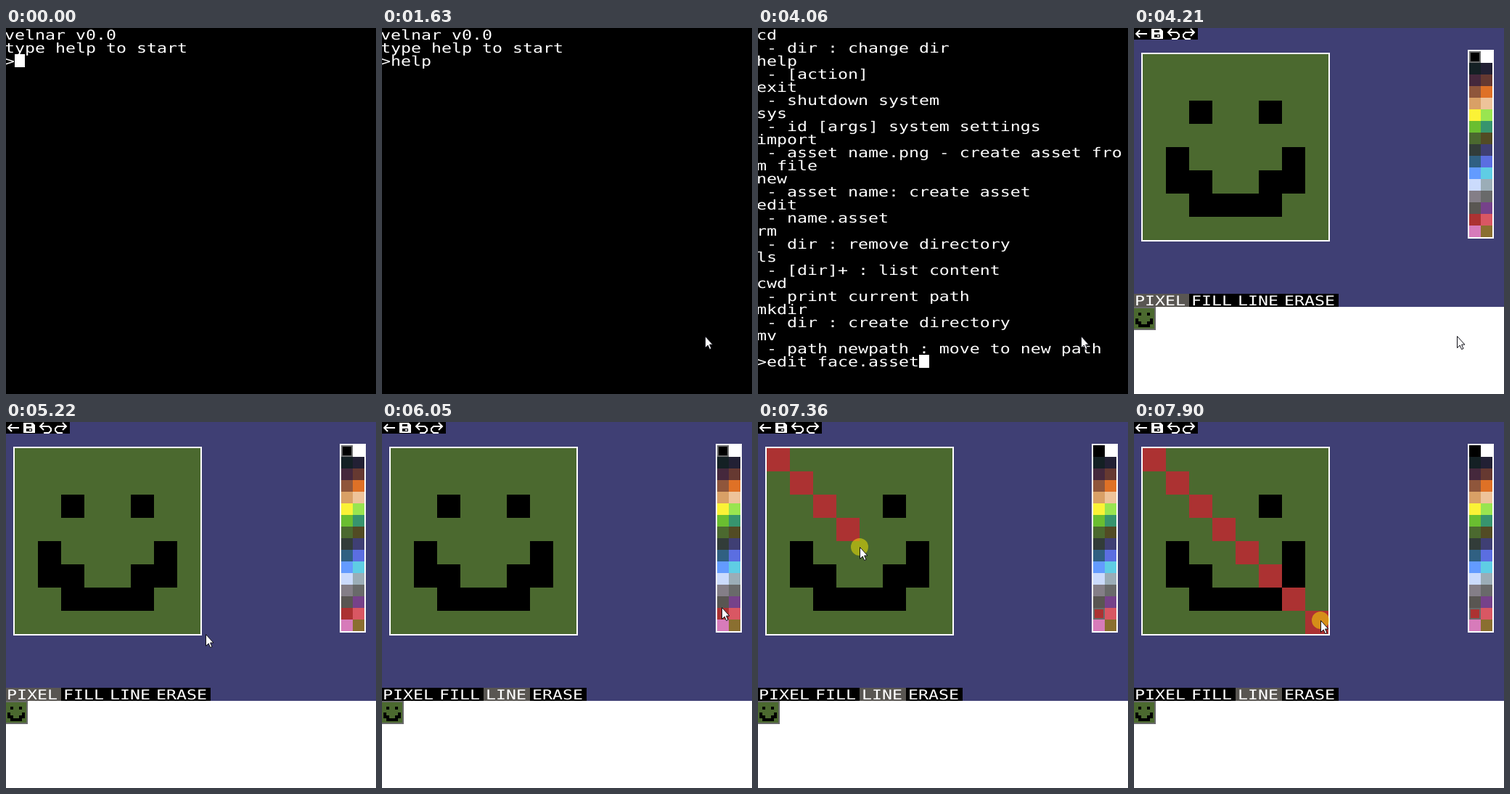
These frames come from a looping animation (510 by 504 pixels, 8 s). An HTML page:

```html
<!DOCTYPE html>
<html lang="en">
<head>
<meta charset="utf-8">
<title>Pixel console</title>
<style>
  html, body { margin: 0; width: 100%; height: 100%; overflow: hidden; background: #000; }
  svg { display: block; width: 510px; height: 504px; }
  text {
    font: 18.6px "DejaVu Sans Mono", "Liberation Mono", monospace;
    text-rendering: geometricPrecision;
    white-space: pre;
    fill: #fff;
  }
</style>
</head>
<body>
<svg id="stage" viewBox="0 0 510 504">
  <rect width="510" height="504"/>
  <g id="console"></g>
  <g id="editor"></g>
  <circle id="press" r="12" fill="#ffee00" opacity=".49"/>
  <path id="pointer" d="M.5 .5V16.5L4.2 13L6.6 18.5L9 17.5L6.6 12H11Z" fill="#fff" stroke="#101018"/>
</svg>
<script>
const LOOP = 8000, EDITOR_AT = 4210, MOVE_AT = 4760, STEP = 76.6;
const $ = id => document.getElementById(id);
const show = (el, on) => el.setAttribute('visibility', on ? 'inherit' : 'hidden');

function add(parent, tag, attrs, content = '') {
  const el = document.createElementNS('http://www.w3.org/2000/svg', tag);
  for (const key in attrs) el.setAttribute(key, attrs[key]);
  el.textContent = content;
  return parent.appendChild(el);
}
const rect = (parent, x, y, width, height, fill) =>
  add(parent, 'rect', { x, y, width, height, fill, 'shape-rendering': 'crispEdges' });
// The console face is a wide one: 14px per character.
const label = (parent, x, baseline, content) =>
  add(parent, 'text', { transform: `translate(${x - 2} ${baseline}) scale(1.25 1)` }, content);

// Console
const INTRO = ['velnar v0.0', 'type help to start'];
const HELP = `cd
 - dir : change dir
help
 - [action]
exit
 - shutdown system
sys
 - id [args] system settings
import
 - asset name.png - create asset fro
m file
new
 - asset name: create asset
edit
 - name.asset
rm
 - dir : remove directory
ls
 - [dir]+ : list content
cwd
 - print current path
mkdir
 - dir : create directory
mv
 - path newpath : move to new path`.split('\n');
const TYPED = [
  [0, ''], [1310, 'h'], [1480, 'he'], [1555, 'hel'], [1630, 'help'],
  [1800, ''], [2650, 'e'], [2820, 'ed'], [3050, 'edit'],
  [3510, 'edit '], [3660, 'edit face.asset']
];
const BLINKS = [200, 550, 930, 1240, 1600, 1950, 2330, 2650, 3050, 3350, 3740, 4060];

const consoleLayer = $('console');
const rows = Array.from({ length: 26 }, (_, i) => label(consoleLayer, 0, 18 * i + 16));
const caret = rect(consoleLayer, 0, 0, 14, 18, '#fff');

function drawConsole(t) {
  const typed = TYPED.filter(([at]) => at <= t).pop()[1];
  const history = t < 1800 ? INTRO : HELP;
  const lines = [...history, '>' + typed];
  rows.forEach((row, i) => {
    const line = lines[i] || '';
    if (row.textContent !== line) row.textContent = line;
  });
  caret.setAttribute('x', 12 + 14 * typed.length);
  caret.setAttribute('y', 18 * history.length);
  show(caret, BLINKS.filter(at => at <= t).length % 2 === 0);
}

// Editor
const GREEN = '#4b692f', RED = '#ac3232', GREY = '#595652';
const PALETTE = ('000000 ffffff 142024 222034 45283c 663931 8f563b df7126 ' +
  'd9a066 eec39a fbf236 99e550 6abe30 37946e 4b692f 524b24 ' +
  '323c39 3f3f74 306082 5b6ee1 639bff 5fcde4 cbdbfc 9badb7 ' +
  '847e87 696a6a 595652 76428a ac3232 d95763 d77bba 8a6f30').split(' ');

const editor = $('editor');
rect(editor, 0, 0, 510, 384, '#3f3f74');
rect(editor, 0, 384, 510, 120, '#fff');

function drawFace(x, y, cell) {
  const block = (col, row, w, h) =>
    rect(editor, x + col * cell, y + row * cell, w * cell, h * cell, '#000');
  rect(editor, x, y, 8 * cell, 8 * cell, GREEN);
  block(2, 2, 1, 1);
  block(5, 2, 1, 1);
  block(1, 4, 1, 2);
  block(6, 4, 1, 2);
  block(2, 5, 1, 1);
  block(5, 5, 1, 1);
  block(2, 6, 4, 1);
}
rect(editor, 10, 34, 260, 260, '#fff');
drawFace(12, 36, 32);
drawFace(-2, 384, 4);
add(editor, 'rect', { x: -1, y: 385, width: 30, height: 30, fill: 'none', stroke: '#696a6a', 'stroke-width': 2 });
const diagonal = Array.from({ length: 8 }, (_, i) => rect(editor, 12 + 32 * i, 36 + 32 * i, 32, 32, RED));

rect(editor, 460, 30, 36, 260, '#fff');
PALETTE.forEach((color, i) =>
  rect(editor, 462 + 16 * (i % 2), 32 + 16 * (i >> 1), 16, 16, '#' + color));
const swatch = add(editor, 'rect', { x: 463, width: 14, height: 14, fill: 'none', stroke: '#696a6a', 'stroke-width': 2 });

rect(editor, 0, 0, 88, 16, '#000');
const icon = (d, fill = 'none') =>
  add(editor, 'path', { d, fill, stroke: fill === 'none' ? '#fff' : 'none', 'stroke-width': 2, 'fill-rule': 'evenodd' });
icon('M3 8H18M8 3L3 8L8 13');
icon('M24 1H37L40 4V15H24ZM28 3V6H35V3ZM28 9V13H36V9ZM32 10H35V12H32Z', '#fff');
icon('M52 1L47 6L52 11M47 6H59L62 9V12L59 15H52');
icon('M78 1L83 6L78 11M83 6H71L68 9V12L71 15H78');

let left = -2;
const tools = ['PIXEL', 'FILL', 'LINE', 'ERASE'].map(name => {
  const width = 14 * name.length + 8;
  const back = rect(editor, left, 366, width, 18, '#000');
  label(editor, left + 5, 382, name);
  left += width;
  return back;
});

// Pointer: time, x, y
const PATH = [
  [70, 444, 408], [380, 456, 432], [549, 456, 432], [550, 445, 424],
  [4690, 445, 424], [4990, 375, 217], [5300, 240, 318], [5526, 152, 375],
  [5680, 152, 375], [5830, 375, 340], [5985, 484, 268], [6062, 468, 255],
  [6139, 470, 266], [6370, 470, 266], [6680, 420, 245], [7134, 30, 47],
  [7211, 30, 47], [7288, 112, 136], [7364, 140, 172], [7901, 257, 273]
];

function pointerAt(t) {
  const i = PATH.findIndex(([at]) => at > t);
  if (i < 0) return PATH[PATH.length - 1].slice(1);
  if (i === 0) return PATH[0].slice(1);
  const [t0, x0, y0] = PATH[i - 1], [t1, x1, y1] = PATH[i];
  const k = (t - t0) / (t1 - t0);
  return [x0 + (x1 - x0) * k, y0 + (y1 - y0) * k];
}

function drawEditor(t) {
  const tool = t > 5590 ? 2 : 0;
  tools.forEach((back, i) => back.setAttribute('fill', i === tool ? GREY : '#000'));
  swatch.setAttribute('y', t > 6280 ? 257 : 33);
  // The line trails the pointer by one step.
  const end = t > 7200 ? Math.floor((pointerAt(t - STEP)[0] - 12) / 32) : -1;
  diagonal.forEach((cell, i) => show(cell, i <= end));
}

function render(time) {
  const t = time % LOOP;
  const editing = t >= EDITOR_AT;
  const stepped = t < MOVE_AT ? t : MOVE_AT + STEP * Math.floor((t - MOVE_AT) / STEP + 0.2);
  const [x, y] = pointerAt(stepped).map(Math.round);
  show(consoleLayer, !editing);
  if (editing) drawEditor(stepped);
  else drawConsole(t);
  editor.setAttribute('display', editing ? 'inline' : 'none');
  $('pointer').setAttribute('transform', `translate(${x} ${y})`);
  show($('pointer'), t >= 70);
  $('press').setAttribute('cx', x);
  $('press').setAttribute('cy', y);
  show($('press'), [[5520, 5650], [6200, 6380], [7130, LOOP]].some(([a, b]) => stepped >= a && stepped < b));
}

let start;
function tick(now) {
  start ??= now;
  render(now - start);
  requestAnimationFrame(tick);
}
render(0);
requestAnimationFrame(tick);
</script>
</body>
</html>
```
